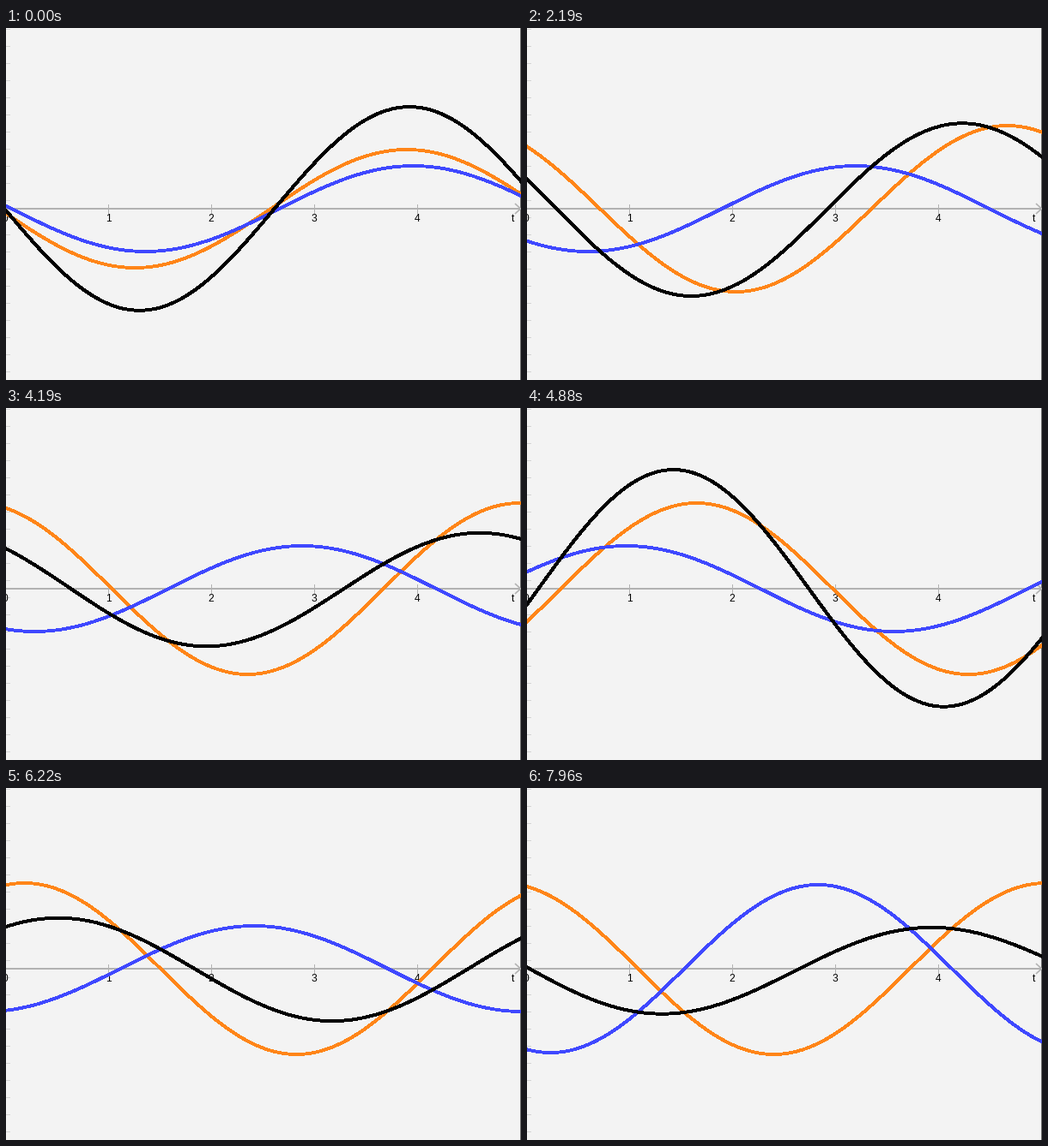
A matplotlib script for the animation above (8 s loop, 600x411 px).

```python
import numpy as np
import matplotlib.pyplot as plt
from matplotlib.animation import FuncAnimation

W, H, DPI = 600, 411, 64
PX = 72 / DPI                # points per pixel
LOOP, STEP = 8000, 20        # ms
MID = 211                    # height of the time axis
K = 0.01                     # wave number, rad per pixel
CREST = 470.6                # crest position at zero shift
LAG = 0.0075                 # the clock runs on while a curve is swept out

# Distance travelled by each wave (pixels) against time (ms)
SHIFT_T = [0, 1040, 2180, 4180, 5460, 6880, 7960]
SHIFT_X = [-5, 350, 715.5, 1381.8, 1804.3, 2294.3, 2644.5]

# Growth of the wave that travels right
GROW_T = [0, 850, 1050, 1900, 2180, 2850, 3300]
GROW_A = [69, 86.5, 87, 93, 97, 101, 100]

FOCUS = (5200, 5800)         # the window edge is lit between these times
GREY, EDGE, LIT = "#b2b2b2", "#6a6a6a", "#0078d7"

fig = plt.figure(figsize=(W / DPI, H / DPI), dpi=DPI, facecolor="#f3f3f3")
ax = fig.add_axes([0, 0, 1, 1])
ax.set_xlim(0, W)
ax.set_ylim(H, 0)
ax.axis("off")


def stroke(xs, ys, color, width, z=1, smooth=True):
    line, = ax.plot(xs, ys, color=color, lw=width * PX, zorder=z, snap=False,
                    antialiased=smooth, solid_capstyle="butt")
    return line


def label(x, text):
    ax.text(x, 226.5, text, family="Liberation Sans", fontsize=12 * PX,
            color="black", ha="center", va="baseline", zorder=2)


for y in range(1, H, 20):
    stroke([0, 5], [y + 0.5] * 2, "#d4d4d4", 1)
edge = stroke([W - 0.5] * 2, [0, H], EDGE, 1)
stroke([0, W], [MID] * 2, GREY, 2)
stroke([593, 599.5, 593], [MID - 6, MID, MID + 6], GREY, 1.6)
for n in range(5):
    x = 120 * n - 0.5
    if n:
        stroke([x] * 2, [206, 217], GREY, 1)
    label(x - 0.5, str(n))
label(590.7, "t")

x = np.linspace(-4, W + 4, 305)
right = stroke(x, x, "#ff8518", 2.8, 3, False)
left = stroke(x, x, "#3f48ff", 2.8, 4, False)
total = stroke(x, x, "black", 2.9, 5, False)


def left_size(t):
    """Steady at 50, then eases towards 100."""
    return 100 - 50 * np.exp(-max(t - 6600, 0) / 420)


def draw(i):
    t = i * STEP
    shift = np.interp(t, SHIFT_T, SHIFT_X) + LAG * (x - W / 2)
    if t > SHIFT_T[-1]:
        shift += 0.333 * (t - SHIFT_T[-1])
    a = np.interp(t, GROW_T, GROW_A) * np.cos(K * (x - CREST - shift))
    b = left_size(t) * np.cos(K * (x - CREST + shift))
    right.set_ydata(MID - a)
    left.set_ydata(MID - b)
    total.set_ydata(MID - a - b)
    edge.set_color(LIT if FOCUS[0] <= t < FOCUS[1] else EDGE)
    return right, left, total, edge


anim = FuncAnimation(fig, draw, frames=LOOP // STEP, interval=STEP,
                     init_func=lambda: draw(0), repeat=True, repeat_delay=0)
plt.show()
```
